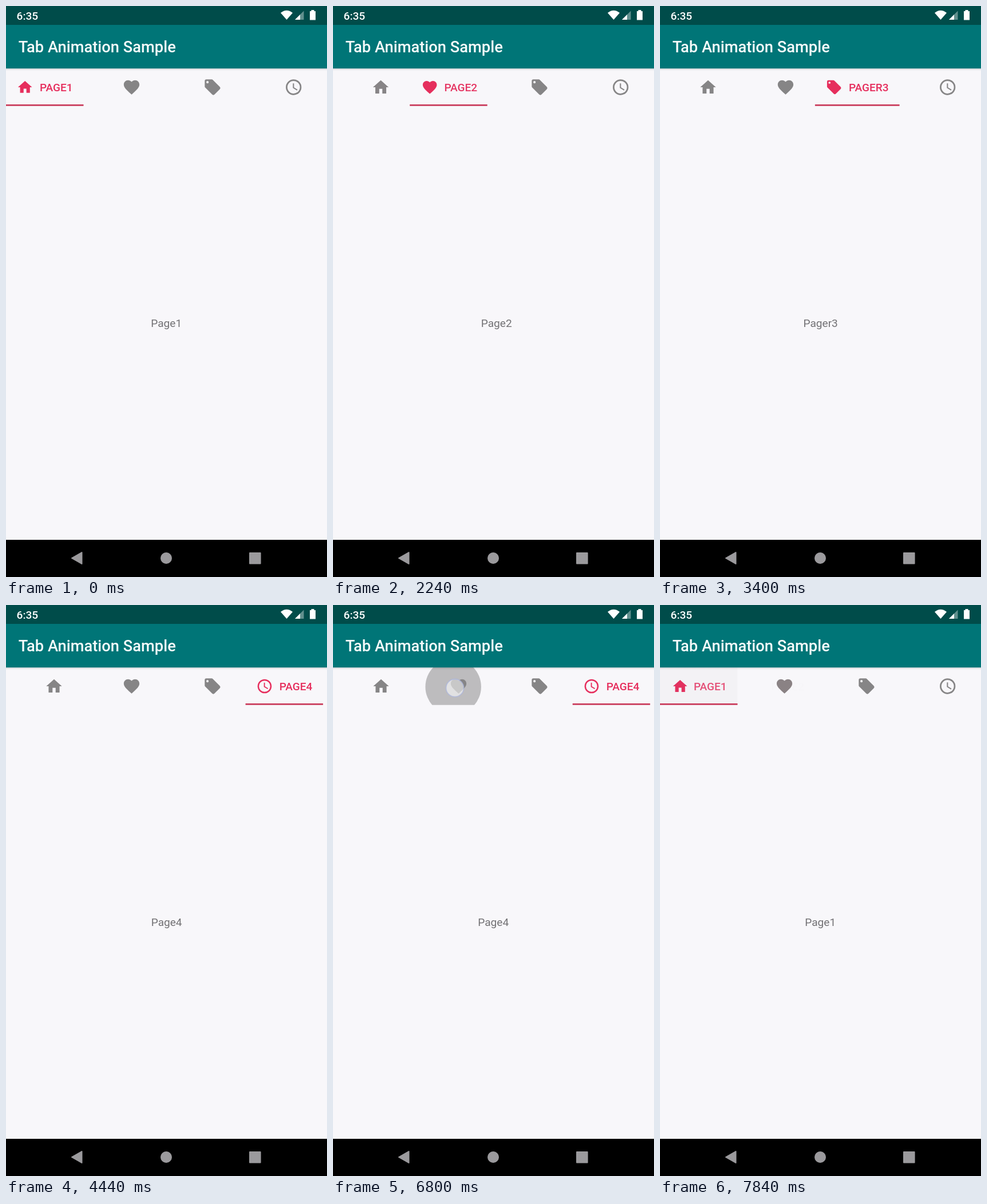
An HTML page that plays this animation: 561 by 998 pixels, repeating every 7.88 s.

```html
<!DOCTYPE html>
<html lang="en">
<head>
<meta charset="utf-8">
<title>Tab Animation Sample</title>
<style>
  html, body { margin: 0; width: 100%; height: 100%; overflow: hidden; background: #f8f7fa; }
  svg { display: block; width: 100%; height: 100%; }
  text { font-family: Roboto, "Noto Sans", sans-serif; font-size: 19.1px; }
  .medium { font-weight: 500; }
  .page { fill: #727174; text-anchor: middle; }
</style>
</head>
<body>
<svg viewBox="0 0 561 998">
  <defs>
    <linearGradient id="shade" x2="0" y2="1">
      <stop offset="0" stop-color="#000" stop-opacity=".13"/>
      <stop offset="1" stop-color="#000" stop-opacity="0"/>
    </linearGradient>
    <clipPath id="tabClip"><rect id="tabBox" y="109" height="65.7"/></clipPath>
  </defs>
  <rect width="561" height="998" fill="#f8f7fa"/>
  <g id="pages"></g>
  <g clip-path="url(#tabClip)"><circle id="ripple"/></g>
  <g id="tabs"></g>
  <rect id="bar" y="172" height="2.7" fill="#c93a5a"/>

  <rect y="109" width="561" height="4" fill="url(#shade)"/>
  <rect y="32" width="561" height="77.2" fill="#007577"/>
  <rect width="561" height="33" fill="#004c4a"/>
  <text class="medium" x="21.7" y="81" fill="#f6fbfb" style="font-size:27.3px">Tab Animation Sample</text>
  <text class="medium" x="18.6" y="24" fill="#fff">6:35</text>
  <g fill="#fff">
    <path d="M480 12Q490.5 3.500 501 12L490.500 24Z"/>
    <path d="M505 24H520.500V8.500Z" opacity=".38"/>
    <path d="M505 24H514V15Z"/>
    <path d="M533.500 9V7H538.500V9H541V24.500H531V9Z"/>
  </g>

  <rect y="933" width="561" height="65" fill="#000"/>
  <g fill="#9b9a9d" stroke="#9b9a9d" stroke-width="2" stroke-linejoin="round">
    <path d="M115 965L132.500 955V975Z"/>
    <circle cx="280" cy="965" r="9"/>
    <rect x="426" y="956" width="18.600" height="18.600"/>
  </g>
  <circle id="touch" r="15.5" fill="#fff" fill-opacity=".55" stroke="#aab4dc" stroke-opacity=".7" stroke-width="1.8"/>
</svg>
<script>
const LOOP = 7880, W = 561, SLOP = 11;
const GREY = [134, 133, 134], PINK = [230, 46, 93];

const TABS = [
  { name: 'Page1', left: 0, width: 135.5, rest: 84,
    icon: '<path d="M10 20v-6h4v6h5v-8h3L12 3 2 12h3v8z"/>' },
  { name: 'Page2', left: 135.5, width: 135.5, rest: 84,
    icon: '<path d="M12 21.35l-1.45-1.32C5.4 15.36 2 12.28 2 8.5 2 5.42 4.42 3 7.5 3c1.74 0 3.41.81 4.5 2.09C13.09 3.81 14.76 3 16.5 3 19.58 3 22 5.42 22 8.5c0 3.78-3.4 6.86-8.55 11.54z"/>' },
  { name: 'Pager3', left: 271, width: 147.7, rest: 90,
    icon: '<path fill-rule="evenodd" d="M21.4 11.6l-9-9Q11.8 2 11 2H4Q2 2 2 4v7q0 .8.6 1.4l9 9q1.400 1.200 2.800 0l7-7q1.200-1.400 0-2.800zM5.500 7a1.500 1.500 0 1 1 0-3 1.500 1.500 0 0 1 0 3z"/>' },
  { name: 'Page4', left: 418.7, width: 135.5, rest: 84,
    icon: '<circle cx="12" cy="12" r="9" fill="none" stroke="currentColor" stroke-width="2"/><path d="M11 7v6l5.250 3.150.75-1.230-4.500-2.670V7z"/>' }
];

const linear = k => k;
const easeIn = k => k ** 1.6;
const smooth = k => k * k * (3 - 2 * k);
const settle = k => 1 - (1 - k) ** 5;

// Pager position: [time, position, easing towards it]
const SCROLL = [
  [0, 0], [1560, 0], [1900, .5, easeIn], [2526, 1, settle],
  [2720, 1], [3000, 1.45, easeIn], [3550, 2, settle],
  [3760, 2], [4040, 2.45, easeIn], [4590, 3, settle],
  [4680, 3], [5160, 2.35, smooth], [5440, 2.35],
  [5600, 2.772, easeIn], [5640, 2.85], [6140, 3, settle],
  [6830, 3], [7130, 1, settle],
  [7618, 1], [7818, 0, settle], [LOOP, 0]
];

const DRAGS = [
  { down: 1400, up: 1900, x: 473, y: 466.5, endY: 500, page: 0 },
  { down: 2440, up: 3000, x: 435, y: 540, endY: 548, page: 1 },
  { down: 3720, up: 4040, x: 440, y: 540, endY: 561, page: 2 },
  { down: 4640, up: 5640, x: 103, y: 558, endY: 565.3, page: 3 }
];
const TAPS = [
  { down: 6640, up: 6840, x: 213, y: 145, tab: 1 },
  { down: 7400, up: 7620, x: 62, y: 145, tab: 0 }
];

const $ = id => document.getElementById(id);
const lerp = (a, b, k) => a + (b - a) * k;
const clamp = (v, lo = 0, hi = 1) => Math.min(hi, Math.max(lo, v));
const set = (el, attrs) => { for (const key in attrs) el.setAttribute(key, attrs[key]); };
const mix = k => `rgb(${GREY.map((c, i) => Math.round(lerp(c, PINK[i], k)))})`;

$('pages').innerHTML = TABS.map(t => `<text class="page" y="561">${t.name}</text>`).join('');
$('tabs').innerHTML = TABS.map(t => `<g><g>${t.icon}</g>
  <text class="medium" x="${t.left + 59}" y="149">${t.name.toUpperCase()}</text></g>`).join('');
const pages = [...$('pages').children];
const tabs = [...$('tabs').children];

function scrollAt(time) {
  const n = SCROLL.findIndex(key => key[0] > time);
  if (n < 1) return 0;
  const [t0, p0] = SCROLL[n - 1];
  const [t1, p1, ease = linear] = SCROLL[n];
  return lerp(p0, p1, ease((time - t0) / (t1 - t0)));
}

function drawPager(pos) {
  pages.forEach((el, i) => el.setAttribute('x', 280.2 + W * (i - pos)));
  const i = Math.min(2, Math.floor(pos)), k = pos - i;
  set($('bar'), {
    x: lerp(TABS[i].left, TABS[i + 1].left, k),
    width: lerp(TABS[i].width, TABS[i + 1].width, k)
  });
}

function drawTabs(pos) {
  TABS.forEach((tab, i) => {
    const k = clamp(1 - Math.abs(pos - i));
    const [icon, label] = tabs[i].children;
    const x = tab.left + lerp(tab.rest, 33.2, k);
    set(tabs[i], { fill: mix(k), color: mix(k) });
    icon.setAttribute('transform', `translate(${x} 142) scale(${lerp(1.365, 1.23, k)}) translate(-12 -12)`);
    // labels stay faint until the tab has nearly arrived
    label.setAttribute('opacity', k < .8 ? .2 * k : lerp(.16, 1, (k - .8) / .2));
  });
}

function drawTouch(time) {
  const g = [...DRAGS, ...TAPS].find(g => time >= g.down && time < g.up + 150);
  let opacity = 0;
  if (g) {
    const now = Math.min(time, g.up);
    let { x, y } = g;
    if (g.page !== undefined) {
      const moved = W * (g.page - scrollAt(now));
      x += moved + clamp(moved, -SLOP, SLOP);
      y = lerp(y, g.endY, (now - g.down) / (g.up - g.down));
    }
    set($('touch'), { cx: x, cy: y });
    opacity = 1 - clamp((time - g.up) / 150);
  }
  $('touch').setAttribute('opacity', opacity);
}

function drawRipple(time) {
  const tap = TAPS.find(g => time >= g.down + 40 && time < g.up + 240);
  let opacity = 0;
  if (tap) {
    const { left, width } = TABS[tap.tab];
    const age = time - tap.down - 40, k = clamp(age / 225);
    set($('tabBox'), { x: left, width });
    set($('ripple'), {
      cx: lerp(tap.x, left + width / 2, k * k),
      cy: lerp(144, 142, k),
      r: lerp(17, 76, k)
    });
    opacity = .24 * clamp(age / 75) * (1 - clamp((time - tap.up) / 240));
  }
  $('ripple').setAttribute('opacity', opacity);
}

function render(time) {
  drawPager(scrollAt(time));
  // after a tap the icons trail the pager
  drawTabs(scrollAt(time > 6700 ? time - 127 : time));
  drawTouch(time);
  drawRipple(time);
}

const start = performance.now();
function tick() {
  render((performance.now() - start) % LOOP);
  requestAnimationFrame(tick);
}
tick();
</script>
</body>
</html>
```
